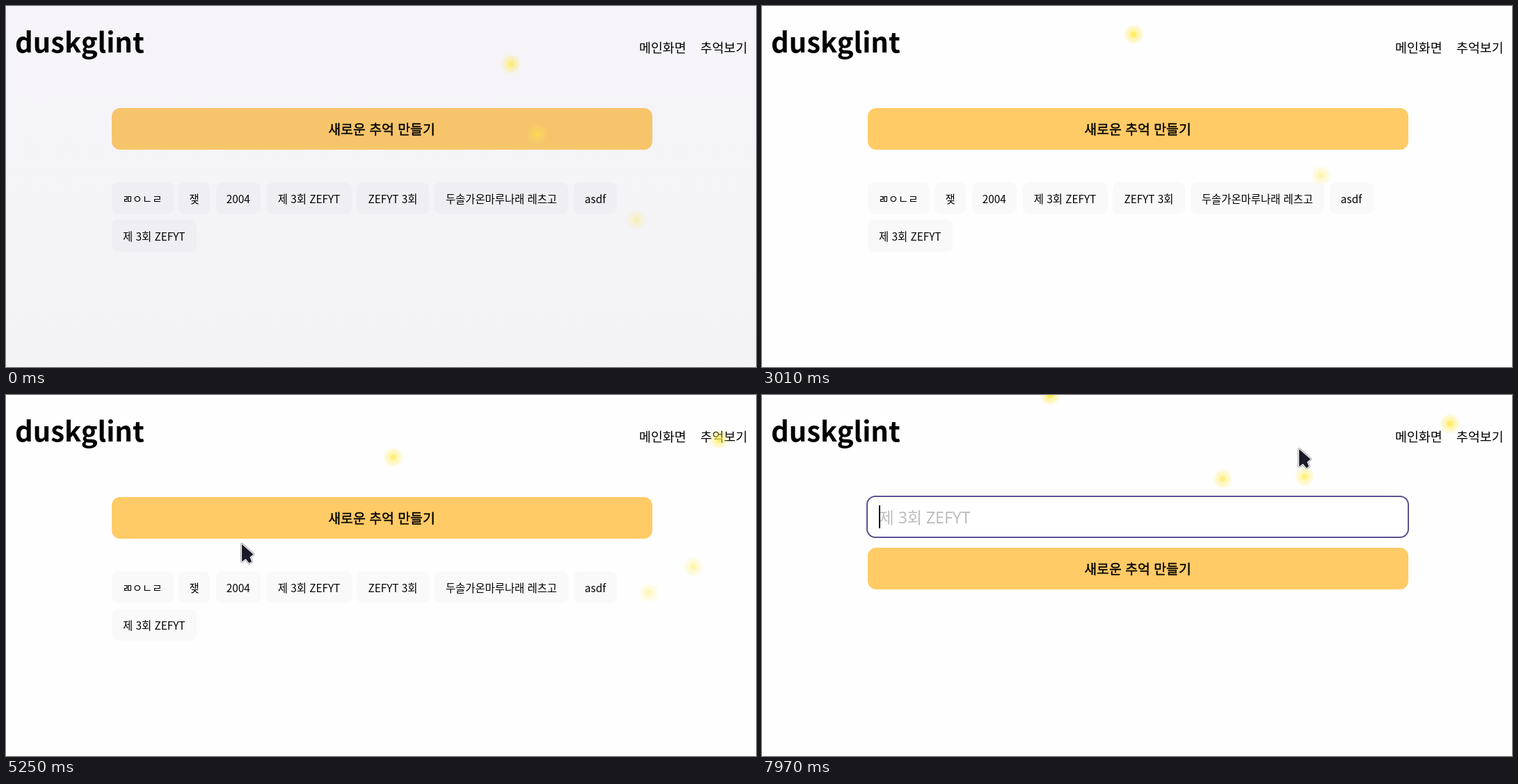
An HTML page that plays this animation: 1078 by 520 pixels, repeating every 8 s.

```html
<!DOCTYPE html>
<html lang="ko">
<head>
<meta charset="utf-8">
<title>duskglint</title>
<style>
  html, body { margin: 0; width: 100%; height: 100%; overflow: hidden; }
  body { font-family: "Noto Sans CJK KR", "Noto Sans CJK", sans-serif; color: #000; }
  #stage {
    position: relative; width: 1078px; height: 520px; overflow: hidden;
    background: #fefefe; --button: #ffcb66; --chip: #f9f9f9;
  }
  #stage.dim {
    background: linear-gradient(#f6f4f8, #f3f3f5);
    --button: #f6c56b; --chip: #efeef2;
  }
  #stage * { position: absolute; box-sizing: border-box; white-space: nowrap; }
  h1 { margin: 0; left: 13px; top: 20px; font-size: 40px; line-height: 60px; font-weight: 700; }
  nav { top: 44px; font-size: 18.4px; line-height: 30px; }
  nav span:first-child { left: 910px; }
  nav span:last-child { left: 998px; }
  #make {
    left: 151.5px; top: 147px; width: 777px; height: 60px; border-radius: 12px;
    background: var(--button); font-size: 19.4px; font-weight: 500;
    -webkit-text-stroke: .4px #000; line-height: 60px; text-align: center;
  }
  .form #make { top: 220px; }
  .chip {
    height: 46px; border-radius: 9px; background: var(--chip);
    font-size: 15.4px; line-height: 46px; text-align: center;
  }
  .form .chip, #field { display: none; }
  .form #field { display: block; }
  #field {
    left: 150px; top: 145px; width: 780px; height: 61px;
    border: 2px solid #5f5093; border-radius: 13px; background: #fff;
  }
  #hint {
    left: 16.5px; top: 0; color: #bdbdbd; line-height: 58px;
    font-size: 23px; font-family: "Noto Sans", "Noto Sans CJK KR", sans-serif;
  }
  #caret { left: 16px; top: 12px; width: 2px; height: 33px; background: #000; }
  .fly {
    left: -15px; top: -15px; width: 30px; height: 30px;
    background: radial-gradient(circle closest-side, rgba(255,232,60,.9) 0 3px,
      rgba(255,232,70,.48) 5.5px, rgba(255,232,80,.42) 9px,
      rgba(255,232,90,.2) 12px, rgba(255,232,90,0) 15px);
  }
  #mouse { left: 0; top: 0; width: 1px; height: 1px; overflow: visible; }
  #mouse path { stroke-linejoin: round; }
</style>
</head>
<body>
<div id="stage">
  <h1>duskglint</h1>
  <nav><span>메인화면</span><span>추억보기</span></nav>
  <div id="field"><span id="hint">제 3회 ZEFYT</span><i id="caret"></i></div>
  <div id="make">새로운 추억 만들기</div>
  <svg id="mouse">
    <g id="arrow">
      <path d="M0 0V25L5.5 21 10.5 27 14 25 11.5 18.5 16.5 14.5Z" fill="none" stroke="#aaa" stroke-width="4"/>
      <path d="M0 0V25L5.5 21 10.5 27 14 25 11.5 18.5 16.5 14.5Z" fill="#1a1a2a" stroke="#fff" stroke-width="2" paint-order="stroke"/>
    </g>
    <g id="beam" fill="none">
      <path d="M-4-12H-1.5L0-11 1.5-12H4M0-11V11M-4 12H-1.5L0 11 1.5 12H4" stroke="#ddd" stroke-width="4"/>
      <path d="M-4-12H-1.5L0-11 1.5-12H4M0-11V11M-4 12H-1.5L0 11 1.5 12H4" stroke="#222" stroke-width="1.6"/>
    </g>
  </svg>
</div>
<script>
const LOOP = 8000, CLEAR = 830, STALL = 6410, OPEN = 6630;
const SLOPE = 0.625, TRAVEL = 735;
const $ = id => document.getElementById(id);
const stage = $('stage'), mouse = $('mouse');

// text, left, top, width
const chips = [
  ['ㄻㅇㄴㄹ', 151.5, 254, 89], ['쟂', 248, 254, 45], ['2004', 301.5, 254, 64.5],
  ['제 3회 ZEFYT', 374.5, 254, 122], ['ZEFYT 3회', 504, 254, 104],
  ['두솔가온마루나래 레츠고', 616, 254, 192], ['asdf', 816, 254, 62],
  ['제 3회 ZEFYT', 151.5, 308, 122.5]
];
for (const [text, left, top, width] of chips) {
  const chip = document.createElement('div');
  chip.className = 'chip';
  chip.textContent = text;
  chip.style.cssText = `left:${left}px;top:${top}px;width:${width}px`;
  stage.insertBefore(chip, mouse);
}

// y offset of the slanted path, speed in px/ms, a known x and its time
const flies = [
  [-258.3, 0.2178, 601, 2080],
  [-292.8, 0.174, 694, 3930],
  [-370, 0.1938, 732, 3930],
  [-576.7, 0.257, 945, 2080],
  [-661, 0.1633, 1075, 6830]
].map(([offset, speed, x, at]) => {
  const el = document.createElement('div');
  el.className = 'fly';
  stage.insertBefore(el, mouse);
  return { el, offset, speed, x, at, start: (-18 - offset) / SLOPE };
});

// time, x, y of the pointer
const route = [
  [3400, 505, 525], [3700, 478, 450], [3930, 461, 400], [4040, 452, 380],
  [4400, 437, 325], [4850, 343, 222], [5250, 339, 215], [5700, 345, 208],
  [6150, 401, 182], [7250, 401, 182], [7800, 764, 82], [7970, 772, 78]
];

function along(t) {
  const i = route.findIndex(p => p[0] > t);
  if (i < 0) return route[route.length - 1].slice(1);
  const [t0, x0, y0] = route[i - 1], [t1, x1, y1] = route[i];
  const k = (t - t0) / (t1 - t0);
  return [x0 + (x1 - x0) * k, y0 + (y1 - y0) * k];
}

function drawFly(fly, t) {
  // the flies run slightly ahead at the beginning
  const time = t + Math.max(0, 105 - t * 0.07);
  const raw = fly.x + fly.speed * (time - fly.at) - fly.start;
  const gone = ((raw % TRAVEL) + TRAVEL) % TRAVEL;
  const x = fly.start + gone;
  fly.el.style.transform = `translate(${x}px,${fly.offset + SLOPE * x}px)`;
  fly.el.style.opacity = 1 - 0.9 * gone / TRAVEL;
}

function drawMouse(t) {
  const shown = t >= route[0][0];
  mouse.style.display = shown ? '' : 'none';
  if (!shown) return;
  const [x, y] = along(t);
  const typing = t >= OPEN && y > 145;
  mouse.style.transform = `translate(${x}px,${y}px)`;
  $('beam').style.display = typing ? '' : 'none';
  $('arrow').style.display = typing ? 'none' : '';
}

function draw(now) {
  let t = now % LOOP;
  if (t > STALL && t < OPEN) t = STALL;
  stage.classList.toggle('dim', t < CLEAR);
  stage.classList.toggle('form', t >= OPEN);
  $('caret').style.opacity = (t - OPEN) % 1000 < 500 ? 1 : 0;
  flies.forEach(fly => drawFly(fly, t));
  drawMouse(t);
}

const begin = performance.now();
function tick() {
  draw(performance.now() - begin);
  requestAnimationFrame(tick);
}
tick();
</script>
</body>
</html>
```
